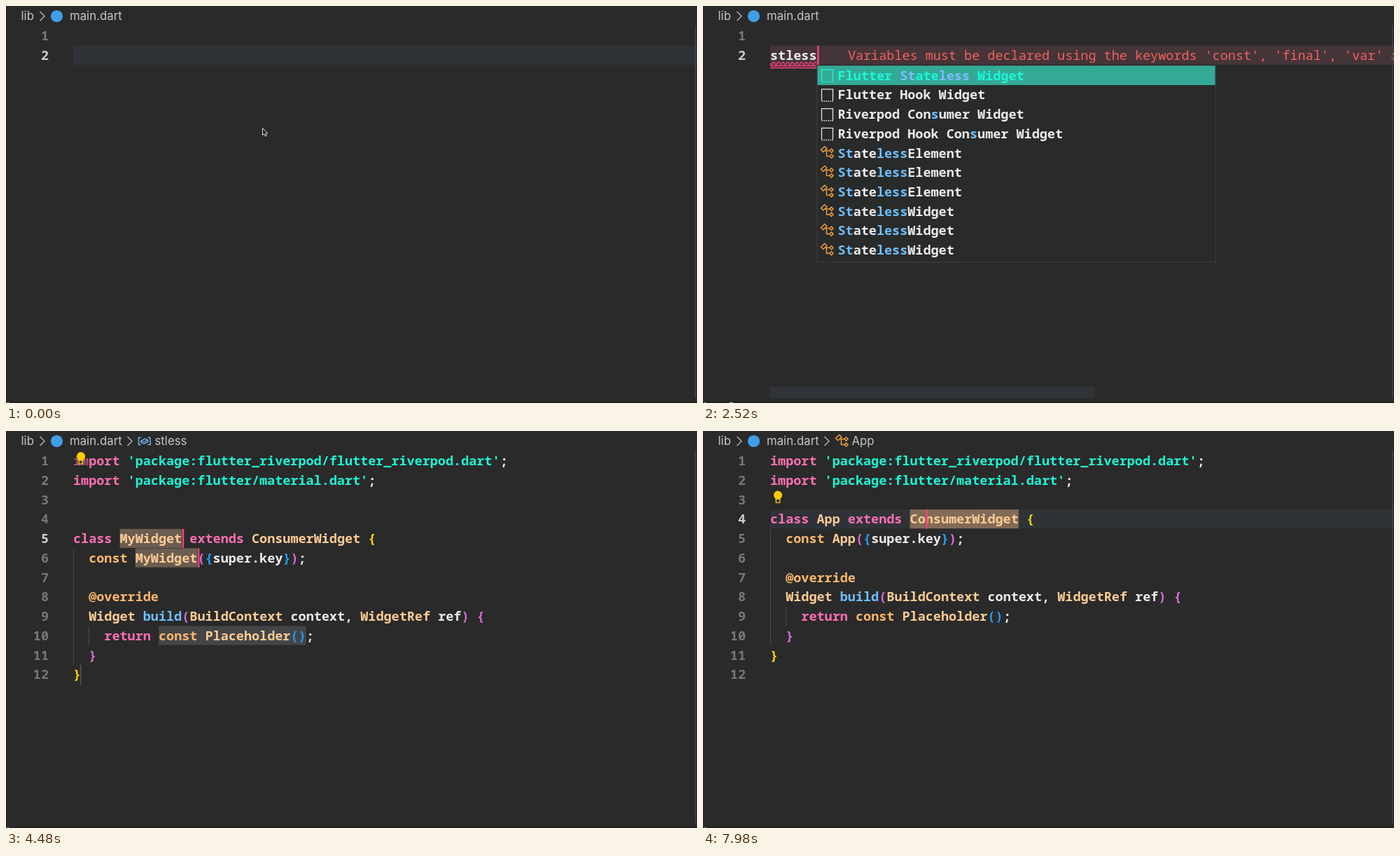
Animation of 987x567 px, one loop 8000 ms. Source, as an HTML page with a canvas:

```html
<!DOCTYPE html>
<html lang="en">
<head>
<meta charset="utf-8">
<title>Editor snippet</title>
<style>
html, body { margin: 0; width: 100%; height: 100%; overflow: hidden; background: #2a2a2a; }
canvas { display: block; width: 987px; height: 567px; }
</style>
</head>
<body>
<canvas id="stage" width="987" height="567"></canvas>
<script>
const ctx = document.getElementById('stage').getContext('2d');
const LOOP = 8000, X0 = 96, CW = 11.088, TOP = 28.9, LH = 27.73;
const MONO = '18.48px "Noto Sans Mono", "DejaVu Sans Mono", monospace';
const SANS = '16.8px Inter, Roboto, sans-serif';
const PINK = '#f5427b', BULB = '#fc0', HOLE = '#434547';
const COLORS = {
  w: '#ececec', p: '#ff70b3', s: '#1df6d5', l: '#ffcc95', o: '#ffb86c',
  f: '#6fbfff', y: '#ffd700', v: '#da70d6', b: '#229fff'
};
const PICKED = { w: '#19f9d8', f: '#7fb9ff' };

const ELEMENT = '§fSt§wate§fless§wElement';
const WIDGET = '§fSt§wate§fless§wWidget';
const OPTIONS = [
  '§wFlutter §fSt§wate§fless§w Widget',
  '§wFlutter Hook Widget',
  '§wRiverpod Con§fs§wumer Widget',
  '§wRiverpod Hook Con§fs§wumer Widget',
  ELEMENT, ELEMENT, ELEMENT, WIDGET, WIDGET, WIDGET
];
const ERROR = "Variables must be declared using the keywords 'const', 'final', 'var' or a type name.";

const during = (t, a, b) => t >= a && t < b;
const colX = c => X0 + c * CW;
const lineY = n => TOP + (n - 1) * LH;
// Latest value in a list of [time, value] steps
const at = (t, steps) => steps.reduce((v, [start, next]) => t >= start ? next : v, null);

function box(x, y, w, h, color) {
  ctx.fillStyle = color;
  ctx.fillRect(x, y, w, h);
}

function line(points, color, width = 1.4, close = false) {
  ctx.beginPath();
  points.forEach(([x, y]) => ctx.lineTo(x, y));
  if (close) ctx.closePath();
  ctx.strokeStyle = color;
  ctx.lineWidth = width;
  ctx.stroke();
}

function label(text, x, y, color, font, align = 'left') {
  ctx.font = font;
  ctx.textAlign = align;
  ctx.fillStyle = color;
  ctx.fillText(text, x, y);
}

function rich(markup, x, y, palette = COLORS) {
  let col = 0;
  markup.split('§').forEach((part, i) => {
    const text = i ? part.slice(1) : part;
    label(text, x + col * CW, y, palette[part[0]] || COLORS.w, 'bold ' + MONO);
    col += text.length;
  });
}

function rowBg(n, color) {
  box(X0, lineY(n), 987 - X0, LH - 0.5, color);
}

function mark(n, col, len, color) {
  box(colX(col), lineY(n), len * CW, LH - 0.6, color);
}

function caret(n, col) {
  box(colX(col) + 0.5, lineY(n), 2.5, LH - 0.4, PINK);
}

function lineNumbers(count, active) {
  for (let n = 1; n <= count; n++)
    label(n, 61, lineY(n) + 20.3, n === active ? '#cfcfcf' : '#777', 'bold ' + MONO, 'right');
}

function chevron(x, y, color, s = 6.5) {
  line([[x, y - s], [x + s, y], [x, y + s]], color, 1.4);
}

function classIcon(x, y) {
  const c = '#f5a33c';
  const diamond = (dx, dy, r) =>
    line([[x + dx - r, y + dy], [x + dx, y + dy - r], [x + dx + r, y + dy], [x + dx, y + dy + r]], c, 1.4, true);
  line([[x, y + 5], [x + 5.2, y], [x + 8.5, y + 3], [x + 3.4, y + 8]], c, 1.4, true);
  line([[x + 6.3, y + 6], [x + 12.5, y + 6]], c);
  line([[x + 8, y + 6], [x + 8, y + 14], [x + 12.5, y + 14]], c);
  diamond(15, 6, 2.6);
  diamond(15, 14, 2.6);
}

function fieldIcon(x, y) {
  const c = '#6fbfff';
  line([[x + 4, y - 5], [x + 1, y - 5], [x + 1, y + 5], [x + 4, y + 5]], c);
  line([[x + 14, y - 5], [x + 17.5, y - 5], [x + 17.5, y + 5], [x + 14, y + 5]], c);
  line([[x + 4.5, y - 0.5], [x + 10, y - 3.5], [x + 14, y - 1.5], [x + 14, y + 1], [x + 8.5, y + 3.8], [x + 4.5, y + 2]], c, 1.3, true);
  line([[x + 4.5, y - 0.5], [x + 8.5, y + 1], [x + 14, y - 1.5]], c, 1.2);
}

function snippetIcon(x, y, color) {
  line([[x, y + 16], [x, y], [x + 16, y], [x + 16, y + 16]], color, 1.3);
  for (let i = 0; i < 6; i++) box(x + i * 2.9, y + 16.3, 1.6, 1.5, color);
}

function bulb(n) {
  const y = lineY(n);
  ctx.globalAlpha = 0.4;
  box(X0, y + 1, 22, LH - 2, '#2a2a2a');
  ctx.globalAlpha = 1;
  ctx.beginPath();
  ctx.arc(107, y + 7.2, 6, Math.PI * 0.8, Math.PI * 0.2);
  ctx.lineTo(110, y + 13.5);
  ctx.lineTo(104, y + 13.5);
  ctx.fillStyle = BULB;
  ctx.fill();
  line([[104.3, y + 12], [104.3, y + 18], [109.7, y + 18], [109.7, y + 12]], BULB, 1.4);
}

function pointer(x, y) {
  ctx.beginPath();
  [[0, 0], [0, 10], [2.3, 8], [3.9, 11.6], [5.7, 10.8], [4.2, 7.4], [7, 7.2]]
    .forEach(([dx, dy]) => ctx.lineTo(x + dx, y + dy));
  ctx.closePath();
  ctx.fillStyle = '#111';
  ctx.fill();
  ctx.strokeStyle = '#e4e4e4';
  ctx.lineWidth = 1;
  ctx.stroke();
}

function beam(x, y) {
  line([[x, y - 7], [x, y + 7]], '#ddd', 1);
  for (const s of [-1, 1])
    line([[x - 3, y + 8 * s], [x, y + 7 * s], [x + 3, y + 8 * s]], '#ddd', 1);
}

function breadcrumb(t) {
  const grey = '#c6c6c6';
  label('lib', 21.5, 20.3, grey, SANS);
  chevron(48.5, 14.5, '#b5b5b5');
  ctx.beginPath();
  ctx.arc(72.5, 14.5, 8.6, 0, 7);
  ctx.fillStyle = '#3f9fe4';
  ctx.fill();
  label('main.dart', 91, 20.3, grey, SANS);
  const name = at(t, [[3500, 'stless'], [4690, 'MyWidget'], [6160, 'App']]);
  if (!name) return;
  chevron(173.5, 14.5, '#b5b5b5');
  if (name === 'stless') fieldIcon(188.5, 14.5);
  else classIcon(189.5, 5.5);
  label(name, 212.5, 20.3, grey, SANS);
}

function popup(t) {
  const pick = at(t, [[0, 0], [3150, 1], [3430, 2], [3640, 3], [4130, 2]]);
  box(162.5, 85, 570, 281.5, '#3a4147');
  box(163.5, 85, 568, 280.5, '#292a2a');
  OPTIONS.forEach((text, i) => {
    const y = 85.2 + i * LH, on = i === pick;
    if (on) box(163.5, y, 568, LH, '#34aa96');
    if (i < 4) snippetIcon(169.5, y + 6, on ? '#19f9d8' : '#e4e4e4');
    else classIcon(168.5, y + 4.5);
    rich(text, 192.5, y + 20.4, on ? PICKED : COLORS);
    if (on && t >= 2730) chevron(702.5, y + 12.5, '#19f9d8', 5);
  });
}

function typing(t) {
  const word = at(t, [[0, ''], [1540, 's'], [1680, 'st'], [1820, 'stl'], [1890, 'stle'], [1960, 'stles'], [2240, 'stless']]);
  const failing = t >= 1750, end = colX(word.length);
  rowBg(2, failing ? '#453538' : '#2f3337');
  lineNumbers(2, 2);
  const y = lineY(2);
  rich('§w' + word, X0, y + 20.3);
  if (failing) {
    label(ERROR, colX(word.length + 4), y + 20.3, '#f56161', '500 ' + MONO);
    const wave = [];
    for (let x = X0; x <= end; x++) wave.push([x, y + 25.2 + 1.7 * Math.sin((x - X0) * 0.95)]);
    line(wave, PINK, 1.3);
    box(X0, y + 27.8, end - X0, 1.7, PINK);
    box(X0, y + 30.9, end - X0, 1.7, PINK);
  }
  const hidden = t < 140 || during(t, 630, 1120) || during(t, 2940, 3500) || t >= 3990;
  if (!hidden) caret(2, word.length);
  if (t >= 2730) bulb(1);

  ctx.globalAlpha = Math.min(1, Math.max(0, (t - 2170) / 280));
  box(95.5, 544, 464.5, 16, '#303338');
  ctx.globalAlpha = 1;
  if (t >= 2310) popup(t);

  if (t < 1540) pointer(...at(t, [[0, [366.5, 174.5]], [140, [67, 42]], [280, [72, 18.5]], [630, [74, 10.5]]]));
}

function sourceLines(name, gap) {
  return [
    "§pimport §s'package:flutter_riverpod/flutter_riverpod.dart'§w;",
    "§pimport §s'package:flutter/material.dart'§w;",
    ...Array(gap).fill(''),
    `§pclass §l${name}§p extends §lConsumerWidget§y {`,
    `§o  const §l${name}§v(§b{§wsuper.key§b}§v)§w;`,
    '',
    '§o  @override',
    '§l  Widget §fbuild§v(§lBuildContext §wcontext, §lWidgetRef §wref§v) {',
    '§p    return §oconst §lPlaceholder§b()§w;',
    '§v  }',
    '§y}'
  ];
}

function code(t) {
  const name = at(t, [[0, 'MyWidget'], [4970, 'A'], [5110, 'Ap'], [5250, 'App']]);
  const saved = t >= 5810, snippet = t < 6300;
  const n = saved ? 4 : 5, len = name.length;
  const selected = t < 4970;

  if (!selected) {
    rowBg(n, '#2f3337');
    if (snippet) rowBg(n + 1, '#2f3337');
  }
  if (snippet) {
    const fill = selected ? '#6c5d51' : HOLE;
    mark(n, 6, len, fill);
    mark(n + 1, 8, len, fill);
    mark(n + 5, 11, 19, HOLE);
    box(saved ? 96 : 105.8, lineY(12), 1.6, LH + 1, '#55575a');
  }
  if (t >= 7980) mark(4, 18, 14, '#826b57');

  box(96, lineY(n + 1), 1, LH * 6, '#47494b');
  box(118, lineY(n + 5), 1, LH, '#47494b');
  lineNumbers(12, n);
  sourceLines(name, saved ? 1 : 2).forEach((text, i) => rich(text, X0, lineY(i + 1) + 20.3));

  if (during(t, 5320, 6300)) {
    for (const col of [8 + len, 8 + len + 12]) {
      ctx.strokeStyle = '#35cfae';
      ctx.lineWidth = 1.2;
      ctx.strokeRect(colX(col) + 0.8, lineY(n + 1) + 0.6, CW - 1.6, LH - 1.4);
    }
  }

  const row = at(t, [[0, 1], [4550, 0], [4760, 4], [6370, 0], [6650, 3]]);
  if (row) bulb(row);

  if (t >= 7700) caret(4, 20);
  else if (!during(t, 6090, 6300) && !during(t, 6720, 6930) && t < 7140) {
    caret(n, 6 + len);
    if (snippet) caret(n + 1, 8 + len);
  }
  if (during(t, 6930, 7700))
    beam(...at(t, [[6930, [127, 160]], [7000, [240, 146]], [7070, [355, 130]], [7140, [267, 126]], [7420, [290, 126]], [7560, [318, 126]]]));
}

function frame(t) {
  box(0, 0, 987, 567, '#2a2a2a');
  if (t < 4480) typing(t);
  else code(t);
  breadcrumb(t);
  box(0, 0, 1, 567, '#202020');
  box(984, 28, 1.3, 532, '#454359');
  box(0, 565.5, 987, 1.5, '#1f1f1f');
  box(2, 566, 2, 1, '#bbb');
  if (during(t, 1540, 4480)) box(38, 566, 5, 1, '#bbb');
}

function tick() {
  frame(performance.now() % LOOP);
  requestAnimationFrame(tick);
}
tick();
</script>
</body>
</html>
```
